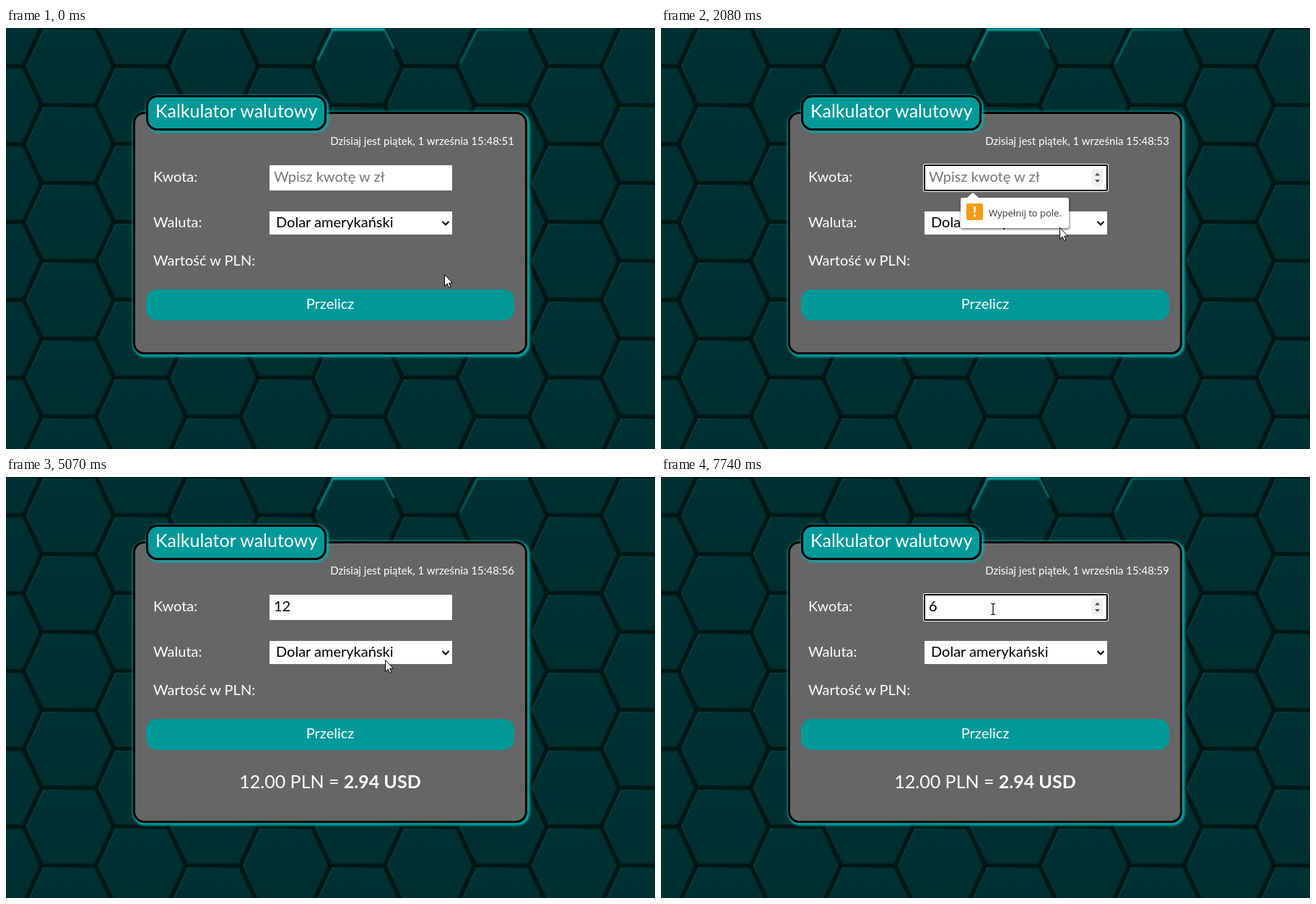
Animation of 899x583 px, one loop 8000 ms. Source, as an HTML page:

```html
<!DOCTYPE html>
<html lang="pl">
<head>
<meta charset="utf-8">
<title>Kalkulator walutowy</title>
<style>
  html, body { margin: 0; width: 100%; height: 100%; overflow: hidden; background: #001717; }
  svg { display: block; }
  text { font: 20px Lato, sans-serif; fill: #fff; white-space: pre; }
  .big { font-size: 25px; }
  .clock { font-size: 15px; text-anchor: end; }
  .mid { text-anchor: middle; }
  .dark { fill: #000; }
  .tip { font: 13px "Open Sans", sans-serif; fill: #333; }
  .glow { fill: none; stroke: #00b4b4; filter: blur(1.5px); transform: translate(1.5px, 1.5px); }
  .frame { stroke: #000; stroke-width: 3; }
  .beam { fill: none; stroke: #00c0c4; stroke-width: 3; stroke-linecap: round; filter: blur(1px); }
  #comb { filter: blur(.7px); }
</style>
</head>
<body>
<svg width="899" height="583" viewBox="0 0 899 583">
  <defs>
    <linearGradient id="rim" x2=".5" y2=".25">
      <stop stop-color="#086062"/><stop offset=".4" stop-color="#033c3d"/><stop offset="1" stop-color="#022a2b"/>
    </linearGradient>
    <linearGradient id="cell" x2="0" y2="1">
      <stop stop-color="#003233"/><stop offset="1" stop-color="#002f30"/>
    </linearGradient>
  </defs>
  <g id="comb" fill="url(#cell)" stroke="url(#rim)" stroke-width="1.6"></g>
  <path class="beam" d="M452 2H524"/>
  <path class="beam" d="M452 4L432 44M525 4L537 28" opacity=".55"/>
  <path class="beam" d="M652 4L629 48M654 2H722" opacity=".35"/>

  <g id="card">
    <rect id="halo" class="glow" x="176" y="116" width="546" height="336" rx="16" stroke-width="4"/>
    <rect id="panel" class="frame" x="177.5" y="117.5" width="543" height="333" rx="14" fill="#666"/>
    <rect class="glow" x="194" y="93" width="250" height="49" rx="16" stroke-width="3"/>
    <rect class="frame" x="195.5" y="94.5" width="247" height="46" rx="14" fill="#099"/>
    <text class="big" x="207" y="124">Kalkulator walutowy</text>
    <text class="clock" id="clock" x="704" y="162"></text>
    <text x="204" y="213">Kwota:</text>
    <text x="204" y="276">Waluta:</text>
    <text x="204" y="329">Wartość w PLN:</text>

    <g id="ring">
      <rect x="363" y="188" width="257" height="39" rx="3" fill="#fff"/>
      <rect x="364" y="189" width="255" height="37" rx="2"/>
    </g>
    <rect id="field" fill="#fff"/>
    <rect id="mark" x="371" y="196" width="23" height="23" fill="#3367d1"/>
    <text id="value" x="371" y="213"></text>
    <path id="caret" d="M0 197V217" stroke="#000"/>
    <g id="spin" fill="#505050">
      <rect x="597" y="195" width="15" height="24" fill="#efefef"/>
      <path d="M601 204.500l3.500-4 3.500 4zM601 210l3.500 4 3.500-4z"/>
    </g>

    <rect x="365" y="254" width="253" height="32" fill="#fff"/>
    <text class="dark" x="374" y="276">Dolar amerykański</text>
    <path d="M604.500 268l4.500 4.500 4.500-4.500" fill="none" stroke="#000" stroke-width="2"/>

    <rect id="button" x="194" y="362" width="510" height="43" rx="15"/>
    <text class="mid" x="449" y="389">Przelicz</text>
    <text class="big mid" id="result" x="449" y="458">12.00 PLN = <tspan font-weight="700">2.94 USD</tspan></text>
  </g>

  <g id="hint">
    <rect x="415" y="236" width="151" height="43" rx="3" style="filter:blur(1.500px)" opacity=".5"/>
    <path d="M418 235H424L432 228 440 235H562Q565 235 565 238V274Q565 277 562 277H418Q415 277 415 274V238Q415 235 418 235Z" fill="#fff"/>
    <rect x="423" y="243" width="23" height="23" rx="2" fill="#f59a0c"/>
    <path d="M433 247h3l-.5 9h-2zM433 258.500h3v3h-3z" fill="#fff"/>
    <text class="tip" x="454" y="261">Wypełnij to pole.</text>
  </g>

  <circle id="press" r="12" fill="#84d65c"/>
  <path id="arrow" d="M.5.5V16.500L4.200 13 6.600 18.500 9 17.500 6.600 12.200H11.500Z" fill="#fff" stroke="#000"/>
  <path id="ibeam" d="M-3-7.500H-1Q0-7.500 0-6.500 0-7.500 1-7.500H3M0-6.500V6.500M-3 7.500H-1Q0 7.500 0 6.500 0 7.500 1 7.500H3" fill="none" stroke="#000" stroke-width="1.200"/>
</svg>
<script>
const LOOP = 8000;
const $ = id => document.getElementById(id);
const set = (id, attrs) => { for (const k in attrs) $(id).setAttribute(k, attrs[k]); };
const show = (id, on) => set(id, { visibility: on ? 'visible' : 'hidden' });
const between = (v, a, b) => v >= a && v < b;
const ramp = (t, a, b) => Math.min(1, Math.max(0, (t - a) / (b - a)));

// Honeycomb of flat-topped cells
const corners = [[-62.5, 0], [-37.5, -54], [37.5, -54], [62.5, 0], [37.5, 54], [-37.5, 54]];
let cells = '';
for (let col = 0; col < 10; col++)
  for (let row = 0; row < 7; row++) {
    const cx = col * 100 - 13, cy = row * 107.8 + (col % 2 ? 53 : -1);
    cells += `<polygon points="${corners.map(([x, y]) => [cx + x * .935, cy + y * .935])}"/>`;
  }
$('comb').innerHTML = cells;

// Pointer path: time, x, y
const path = [
  [0, 607, 341], [20, 607, 341], [470, 590, 372], [610, 590, 372], [630, 592, 371],
  [1300, 592, 371], [1740, 585, 333], [2490, 513, 208], [3200, 513, 208],
  [3870, 538, 378], [4680, 538, 378], [5070, 525, 253], [5460, 410, 180],
  [5570, 410, 180], [5810, 360, 177], [6140, 360, 177], [6360, 460, 183], [LOOP, 460, 183]
];
const ticks = [420, 1450, 2640, 3640, 4690, 5700, 6790, 7740];
const typed = [[0, ''], [2620, '1'], [2800, '12'], [7100, '6']];
const caretResets = [1100, 2620, 2800, 7100];
const last = (list, ok) => list.filter(ok).pop();

function pointer(t) {
  const i = path.findIndex(p => p[0] > t);
  const [t0, x0, y0] = path[i - 1], [t1, x1, y1] = path[i];
  const k = (t - t0) / (t1 - t0);
  return [x0 + (x1 - x0) * k, y0 + (y1 - y0) * k];
}

function draw(t) {
  const [x, y] = pointer(t);
  const done = t >= 4200, lift = done ? 27 : 0, localY = y + lift;
  const focus = between(t, 1100, 4050) || t >= 5570;
  const selected = between(t, 5740, 7100);
  const clicking = between(t, 940, 1080) || between(t, 4050, 4200);
  const dragging = between(t, 5570, 5950);
  const inField = between(x, 355, 618) && between(localY, 190, 225);
  const hover = between(x, 194, 704) && between(localY, 362, 404);
  const text = last(typed, s => s[0] <= t)[1];

  set('card', { transform: `translate(0 ${-lift})` });
  set('halo', { height: done ? 390 : 336 });
  set('panel', { height: done ? 387 : 333 });
  show('result', done);
  $('clock').textContent = 'Dzisiaj jest piątek, 1 września 15:48:' + (51 + ticks.filter(s => s <= t).length);

  show('ring', focus);
  show('spin', focus || inField);
  set('field', focus ? { x: 366, y: 191, width: 251, height: 33 } : { x: 365, y: 190, width: 253, height: 35 });
  show('mark', selected);
  $('value').textContent = text || 'Wpisz kwotę w zł';
  $('value').style.fill = selected ? '#fff' : text ? '#000' : '#757575';
  const reset = last(caretResets, s => s <= t);
  show('caret', focus && !between(t, 5570, 7100) && (t - reset) % 1000 < 500);
  set('caret', { transform: `translate(${371.5 + text.length * 11.6} 0)` });

  set('button', { fill: clicking ? '#00b3b3' : hover ? '#00a3a3' : '#099' });
  set('hint', { opacity: ramp(t, 1100, 1345) * (1 - ramp(t, 2640, 2890)) });

  show('press', clicking || dragging);
  show('arrow', !inField);
  show('ibeam', inField);
  for (const id of ['press', 'arrow', 'ibeam'])
    set(id, { transform: `translate(${Math.round(x)} ${Math.round(y)})` });
}

const start = performance.now();
function loop() {
  draw((performance.now() - start) % LOOP);
  requestAnimationFrame(loop);
}
loop();
</script>
</body>
</html>
```
